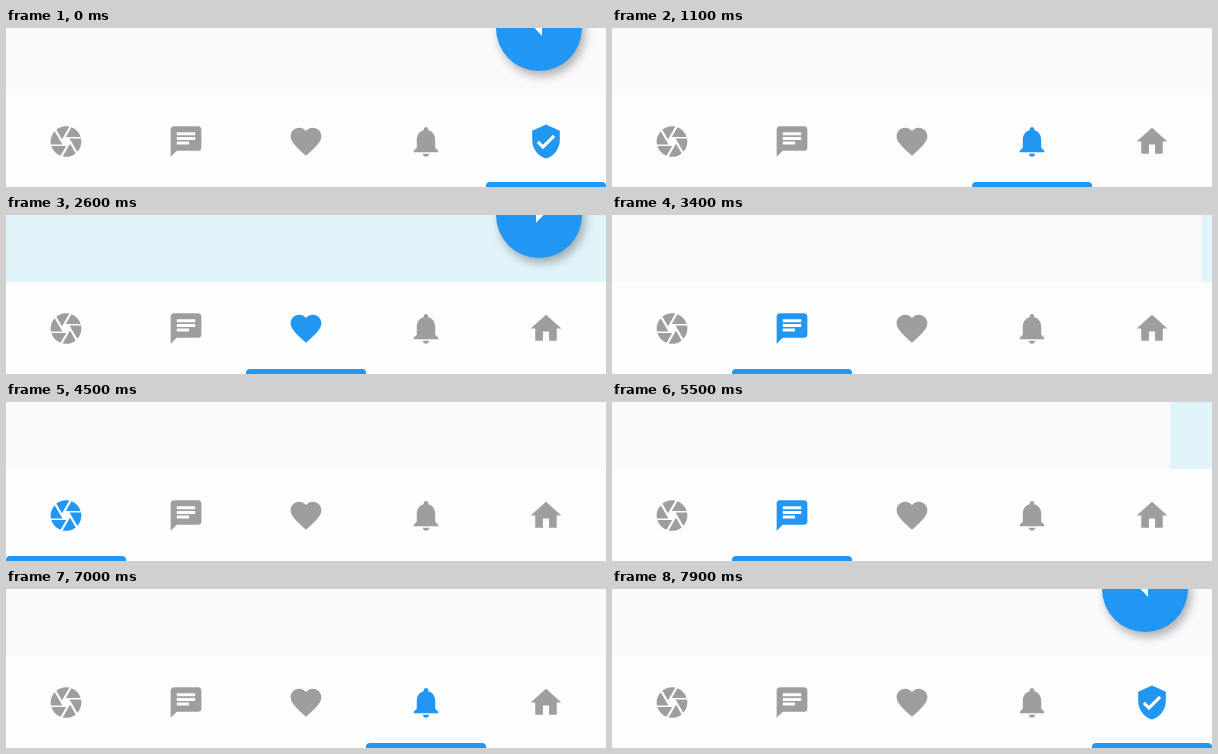
An HTML page for the animation above (8 s loop, 600 px wide and 159 px high).

```html
<!DOCTYPE html>
<html lang="en">
<head>
<meta charset="utf-8">
<title>Swipe navigation bar</title>
<style>
  html, body { margin: 0; width: 100%; height: 100%; overflow: hidden; background: #faf9fb; }
  svg { display: block; width: 600px; height: 159px; }
  .tab { fill: #9e9e9e; }
  .tab.on, .accent { fill: #2196f3; }
  .tab .active, .tab.on .idle { display: none; }
  .tab.on .active { display: inline; }
  .fab { filter: drop-shadow(3px 5px 5px rgba(0, 0, 0, .3)); }
</style>
</head>
<body>
<svg viewBox="0 0 600 159">
  <rect width="600" height="159" fill="#faf9fb"/>
  <rect id="page" width="600" height="67" fill="#e0f4fa"/>

  <g class="fab" data-tab="2">
    <circle class="accent" r="43"/>
    <path fill="#fff" d="M-3 7.7L4.6 0L-3 -7.7z"/>
  </g>
  <g class="fab" data-tab="4">
    <circle class="accent" r="43"/>
    <path fill="#fff" d="M3 7.7L-4.6 0L3 -7.7z"/>
  </g>

  <rect y="67" width="600" height="92" fill="#fefdfe"/>

  <g class="tab"><path d="M9.4 10.5l4.77-8.26C13.47 2.09 12.75 2 12 2c-2.4 0-4.6.85-6.32 2.25l3.66 6.35.06-.1zM21.54 9c-.92-2.92-3.15-5.26-6-6.34L11.88 9h9.66zm.26 1h-7.49l.29.5 4.76 8.25C21 16.97 22 14.61 22 12c0-.69-.07-1.35-.2-2zM8.54 12l-3.9-6.75C3.01 7.03 2 9.39 2 12c0 .69.07 1.35.2 2h7.49l-1.15-2zm-6.08 3c.92 2.92 3.15 5.26 6 6.34L12.12 15H2.46zm11.27 0l-3.9 6.76c.7.15 1.42.24 2.17.24 2.4 0 4.6-.85 6.32-2.25l-3.66-6.35-.93 1.6z"/></g>
  <g class="tab"><path d="M20 2H4c-1.1 0-1.99.9-1.99 2L2 22l4-4h14c1.1 0 2-.9 2-2V4c0-1.1-.9-2-2-2zM6 9h12v2H6V9zm8 5H6v-2h8v2zm4-6H6V6h12v2z"/></g>
  <g class="tab"><path d="M12 21.35l-1.45-1.32C5.4 15.36 2 12.28 2 8.5 2 5.42 4.42 3 7.5 3c1.74 0 3.41.81 4.5 2.09C13.09 3.81 14.76 3 16.5 3 19.58 3 22 5.42 22 8.5c0 3.78-3.4 6.86-8.55 11.54L12 21.35z"/></g>
  <g class="tab"><path d="M12 22c1.1 0 2-.9 2-2h-4c0 1.1.89 2 2 2zm6-6v-5c0-3.07-1.64-5.64-4.5-6.32V4c0-.83-.67-1.5-1.5-1.5s-1.5.67-1.5 1.5v.68C7.63 5.36 6 7.92 6 11v5l-2 2v1h16v-1l-2-2z"/></g>
  <g class="tab">
    <path class="idle" d="M10 20v-6h4v6h5v-8h3L12 3 2 12h3v8z"/>
    <path class="active" d="M12 1L3 5v6c0 5.55 3.84 10.74 9 12 5.16-1.26 9-6.45 9-12V5l-9-4zm-2 16l-4-4 1.41-1.41L10 14.17l6.59-6.59L18 9l-8 8z"/>
  </g>

  <rect id="bar" class="accent" y="154" width="120" height="12" rx="4"/>
</svg>

<script>
  const LOOP = 8000, STEP = 100, TAB_W = 120, PAGE_W = 600;
  const SWIPE = 700, SWITCH = 205, SLIDE = 300, POP = 200;
  const route = [4, 3, 2, 1, 0, 1, 2, 3, 4];
  const starts = [600, 1790, 2881, 3700, 4550, 5452, 6388, 7200];

  const page = document.getElementById('page');
  const bar = document.getElementById('bar');
  const fabs = document.querySelectorAll('.fab');
  const tabs = document.querySelectorAll('.tab');
  const clamp = x => Math.min(1, Math.max(0, x));
  const swipeEase = x => 1 - (1 - x ** 1.5) ** 4;
  const smooth = x => x * x * (3 - 2 * x);

  tabs.forEach((tab, i) => tab.setAttribute('transform',
    `translate(${60 + i * TAB_W} 113.5) scale(1.536) translate(-12 -12)`));

  // Follows the route, each leg beginning `delay` after its swipe starts.
  function follow(t, delay, duration, ease) {
    return starts.reduce((pos, s, i) =>
      pos + (route[i + 1] - route[i]) * ease(clamp((t - s - delay) / duration)), route[0]);
  }

  function draw(t) {
    const done = starts.filter(s => t >= s + SWITCH).length;
    const current = route[done];
    const previous = done ? route[done - 1] : current;
    const pop = done ? clamp((t - starts[done - 1] - SWITCH) / POP) : 1;

    page.setAttribute('x', (2 - follow(t, 0, SWIPE, swipeEase)) * PAGE_W);
    bar.setAttribute('x', follow(t, SWITCH, SLIDE, smooth) * TAB_W);
    tabs.forEach((tab, i) => tab.classList.toggle('on', i === current));
    fabs.forEach(fab => {
      const id = +fab.dataset.tab;
      const size = id === current ? pop : id === previous ? 1 - pop : 0;
      fab.style.display = size ? '' : 'none';
      fab.setAttribute('transform', `translate(533 0) scale(${size})`);
    });
  }

  function tick() {
    const t = (performance.now() + 8) % LOOP;
    draw(Math.floor(t / STEP) * STEP);
    requestAnimationFrame(tick);
  }
  tick();
</script>
</body>
</html>
```
